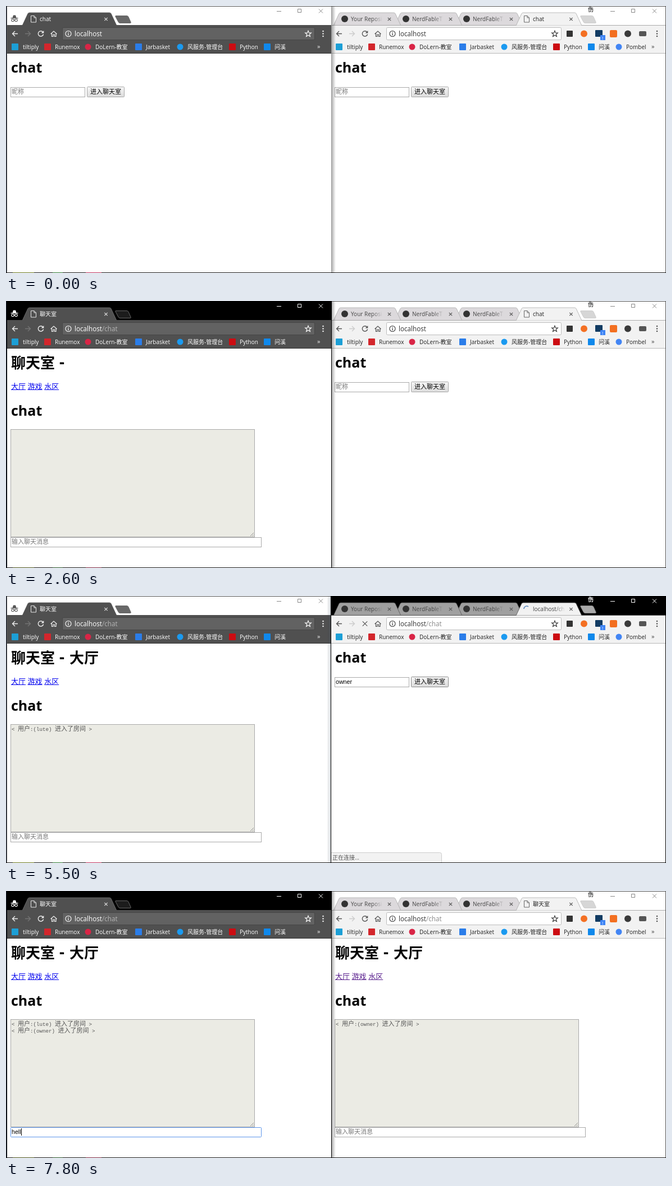
Write an HTML page that moves like this. It is 1175 px wide and 477 px high and loops after 8000 ms.

```html
<!DOCTYPE html>
<html lang="zh">
<head>
<meta charset="utf-8">
<title>chat</title>
<style>
html, body { margin: 0; width: 100%; height: 100%; overflow: hidden; background: #fff; }
svg { display: block; width: 1175px; height: 477px; }
text { white-space: pre; font-family: "Open Sans", "Noto Sans CJK SC", "Noto Sans CJK JP", sans-serif; }
.form { font-family: "Liberation Sans", "Noto Sans CJK SC", "Noto Sans CJK JP", sans-serif; }
.mono { font-family: "Liberation Mono", "Noto Sans CJK SC", "Noto Sans CJK JP", monospace; }
</style>
</head>
<body>
<svg viewBox="0 0 1175 477" xmlns="http://www.w3.org/2000/svg">
  <defs>
    <linearGradient id="btn" x2="0" y2="1"><stop stop-color="#f6f6f6"/><stop offset="1" stop-color="#dcdcdc"/></linearGradient>
    <linearGradient id="fade"><stop offset=".7" stop-color="#444"/><stop offset="1" stop-color="#444" stop-opacity=".1"/></linearGradient>
    <linearGradient id="shadeR"><stop stop-color="#000" stop-opacity=".3"/><stop offset="1" stop-color="#000" stop-opacity="0"/></linearGradient>
    <linearGradient id="shadeL"><stop stop-color="#345" stop-opacity="0"/><stop offset="1" stop-color="#345" stop-opacity=".22"/></linearGradient>
  </defs>
  <g id="stage"></g>
</svg>
<script>
const LOOP = 8000, STEP = 100, SHIFT = 577, FORM = 10.67;
const stage = document.getElementById("stage");
const pen = document.createElement("canvas").getContext("2d");
pen.font = FORM + 'px "Liberation Sans", sans-serif';

const rect = (x, y, w, h, fill, more = "") =>
  `<rect x="${x}" y="${y}" width="${w}" height="${h}" fill="${fill}" ${more}/>`;
const disc = (x, y, r, fill, more = "") => `<circle cx="${x}" cy="${y}" r="${r}" fill="${fill}" ${more}/>`;
const shape = (d, fill, more = "") => `<path d="${d}" fill="${fill}" ${more}/>`;
const line = (d, color, w = 1) => shape(d, "none", `stroke="${color}" stroke-width="${w}"`);
const text = (x, y, s, size, fill, more = "") =>
  `<text x="${x}" y="${y}" font-size="${size}" fill="${fill}" ${more}>${s}</text>`;
const group = (x, body) => `<g transform="translate(${x} 0)">${body}</g>`;

// Text typed so far: one character at each listed time
const typed = (word, times, t) => word.slice(0, times.filter(k => t >= k).length);
const caretOn = (t, start, keys) => {
  const last = Math.max(start, ...keys.filter(k => t >= k));
  const first = last === start ? 400 : 500;
  return t - last < first || Math.floor((t - last - first) / 500) % 2 === 1;
};

/* ---------- browser chrome ---------- */

function controls(x, color) {
  return line(`M${x - 4} 9.5h8`, color) + line(`M${x + 33.5} 5.5h6v6h-6z`, color) +
    line(`M${x + 71} 5.5l7 7m0 -7l-7 7`, color);
}

function tab(x, w, fill, stroke) {
  return shape(`M${x} 35L${x + 10} 13.5Q${x + 11} 12 ${x + 13} 12H${x + w - 13}Q${x + w - 11} 12 ${x + w - 10} 13.5L${x + w} 35z`,
    fill, `stroke="${stroke}" stroke-width=".8"`);
}

const cross = (x, y, color, r = 2.7) => line(`M${x - r} ${y - r}l${2 * r} ${2 * r}m0 ${-2 * r}l${-2 * r} ${2 * r}`, color, 1.2);
const docIcon = (x, color) => line(`M${x} 17.5h5.5l3.5 3.5v8h-9zM${x + 5.5} 17.5v3.5h3.5`, color);
const newTab = (x, fill, stroke) =>
  shape(`M${x} 19Q${x - 1} 17.5 ${x + 1} 17.5H${x + 20}q2 0 3 2l4 9q1 2 -1 2H${x + 8}q-2 0 -3 -2z`, fill, `stroke="${stroke}"`);

function nav(color, dim, loading) {
  const reload = loading ? cross(62, 49.5, color, 4.2)
    : line("M65.8 46.6A4.7 4.7 0 1 0 66.6 50.5", color, 1.4) + shape("M67.3 44v4.6h-4.6z", color);
  return line("M21 49.5H11.5M16 45l-4.5 4.5 4.5 4.5", color, 1.4) +
    line("M34 49.5h9.5M39 45l4.5 4.5 -4.5 4.5", dim, 1.4) + reload +
    line("M79.5 50l5.5 -5 5.5 5M81.5 49v5.5h2.5v-3.5h2.5v3.5h2.5v-5.5", color, 1.2);
}

function address(x, w, fill, edge, color, dim, path) {
  return rect(x + .5, 38.5, w, 22, fill, `rx="2" stroke="${edge}"`) +
    disc(x + 11, 49.5, 5, "none", `stroke="${color}" stroke-width="1.1"`) +
    line(`M${x + 11} 48.5v4M${x + 11} 46.3v1.2`, color, 1.2) +
    text(x + 22, 53.5, `localhost<tspan fill="${dim}">${path}</tspan>`, 11.7, color) +
    star(x + w - 11, color);
}

function star(x, color) {
  let d = "";
  for (let i = 0; i < 10; i++) {
    const a = i * Math.PI / 5, r = i % 2 ? 2.4 : 5.7;
    d += (i ? "L" : "M") + (x + r * Math.sin(a)).toFixed(1) + " " + (49.8 - r * Math.cos(a)).toFixed(1);
  }
  return line(d + "z", color, 1.1);
}

const dots = (x, color) => [45, 49.5, 54].map(y => disc(x, y, 1.3, color)).join("");

// label, text x, mark x, mark colour, round mark
const MARKS = [
  ["tiltiply", 30, 16, "#1c9fd6", 0], ["Runemox", 87, 74, "#d3262c", 0],
  ["DoLern-教室", 159, 146, "#d92546", 1], ["Jarbasket", 249, 236, "#2b7de9", 0],
  ["风服务-管理台", 323, 310, "#1b9af0", 1], ["Python", 416, 403, "#cc0c12", 0],
  ["问溪", 478, 465, "#0f88eb", 0], ["Pombel", 527, 514, "#4285f4", 1]
];

function bookmarks(count, color) {
  return MARKS.slice(0, count).map(([label, x, mx, fill, round]) =>
    (round ? disc(mx, 73, 5.5, fill) : rect(mx - 6, 67, 12, 12, fill, 'rx="1"')) +
    text(x, 76.6, label, 10, color)).join("");
}

function leftChrome(s) {
  const on = s.leftOn, ink = on ? "#fff" : "#555";
  let out = rect(1, 0, 578, 35, on ? "#000" : "#fff") + controls(486, on ? "#fff" : "#888");
  if (!s.noBadge) {
    out += shape("M11.5 21l1.5 -4.5h4l1.5 4.5z", ink) + line("M8.5 21.7h13", ink, 1.2) +
      [12, 18].map(x => disc(x, 25.5, 2.2, "none", `stroke="${ink}" stroke-width="1.1"`)).join("") + line("M14 25h2", ink);
  }
  out += tab(29, 168, "#505050", on ? "#777" : "#505050") + newTab(195, on ? "#1c1c1c" : "#686868", on ? "#666" : "#686868");
  out += docIcon(44.5, "#e8e8e8") + text(60, 27, s.leftChat ? "聊天室" : "chat", 10, "#fff") + cross(178, 23.5, "#ddd");
  out += rect(1, 34, 578, 51, "#505050") + rect(1, 84, 578, 1, "#333");
  return out + nav("#eee", "#737373", false) +
    address(100, 449, "#626262", "#454545", "#fff", "#b5b5b5", s.leftChat ? "/chat" : "") +
    dots(564.5, "#eee") + bookmarks(7, "#fff") + text(554, 76, "»", 11, "#eee");
}

function rightChrome(s) {
  const on = s.rightOn, idle = on ? "#a0a0a0" : "#dcd9dc", edge = on ? "#555" : "#aaa";
  let out = rect(579, 0, 595, 35, on ? "#000" : "#fff") + controls(1080, on ? "#fff" : "#888") +
    text(1036, 10, "伤", 10, on ? "#fff" : "#444", 'font-weight="700"');
  [["NerdFableT", 800], ["NerdFableT", 692], ["Your Reposi", 583]].forEach(([label, x]) => {
    out += tab(x, 120, idle, edge) + disc(x + 20, 23, 6, "#333") +
      text(x + 31, 27, label, 10, "url(#fade)") + cross(x + 99.5, 23.5, "#555");
  });
  out += newTab(1023, on ? "#aaa" : "#d6d6d6", on ? "#888" : "#ccc");
  out += rect(579, 34, 595, 1, edge) + tab(908, 117, "#f2f2f2", edge);
  if (s.loading) {
    out += `<g transform="rotate(${(5500 - s.t) * .36} 927 23)">` + line("M922 23A5 5 0 0 1 929.9 19", "#5a87bd", 1.6) + "</g>" +
      text(938, 27, "localhost/ch", 10, "url(#fade)");
  } else {
    out += docIcon(922.5, "#666") + text(938, 27, s.rightChat ? "聊天室" : "chat", 10, "#222");
  }
  out += cross(1006, 23.5, "#555") + rect(579, 35, 595, 50, "#f2f2f2") + rect(579, 84, 595, 1, "#b8b8b8");
  out += group(SHIFT, nav("#555", "#ccc", s.loading) + bookmarks(8, "#222"));
  out += address(677, 311, "#fff", "#bcbcbc", "#333", "#888", s.loading || s.rightChat ? "/chat" : "");
  out += rect(998, 44, 11, 11, "#333", 'rx="1"') + disc(1029, 49.5, 6, "#f47023") +
    rect(1049, 43, 13, 12, "#123c63", 'rx="1"') + rect(1058, 52, 9, 9, "#3d84f5") + text(1061, 60, "!", 8, "#fff") +
    rect(1075, 43, 13, 13, "#f36f20", 'rx="2"') + disc(1107, 49.5, 6, "#3a3a3a") +
    rect(1127, 45, 13, 9, "#555", 'rx="2"');
  return out + dots(1159, "#555") + text(1149, 76, "»", 11, "#444");
}

/* ---------- pages ---------- */

function field(y, w, f) {
  const shown = f.value ? text(10, y + 12, f.value, FORM, "#000", 'class="form"')
    : text(10, y + 12, f.hint, 11, "#777", 'class="form"');
  const x = Math.round(10 + pen.measureText(f.value).width);
  return rect(8.5, y + .5, w, 17, "#fff", f.focus ? 'rx="1" stroke="#5a94ea"' : 'stroke="#a9a9a9"') +
    shown + (f.focus && f.caret ? rect(x, y + 2, 1, 13, "#000") : "");
}

const heading = (x, y, s, size) => text(x, y, s, size, "#000", 'font-weight="700"');

function loginPage(p) {
  const b = p.button;
  let out = heading(9, 119, "chat", 25) + field(145, 132, p.name) +
    rect(144.5, 144.5, 66, 18, b === 2 ? "#e9e9e9" : "url(#btn)", `rx="1" stroke="${b === 1 ? "#8c8c8c" : "#a8a8a8"}"`) +
    text(150, 157, "进入聊天室", 11, "#000", 'class="form"');
  if (p.list) {
    const h = p.list.length * 19.6 + 1;
    out += `<g opacity="${p.listAlpha}">` + rect(8.5, 162.5, 132.5, h, "#fff", 'stroke="#a9a9a9"') +
      p.list.map((s, i) => text(15, 176.3 + i * 19.6, s, FORM, "#000", 'class="form"')).join("") + "</g>";
  }
  return out;
}

function entered(user, y) {
  const cn = s => `<tspan font-size="11">${s}</tspan>`;
  return text(10, y, `&lt; ${cn("用户")}:(${user}) ${cn("进入了房间")} &gt;`, 9.17, "#555", 'class="mono"');
}

function chatPage(p) {
  const color = p.visited ? "#551a8b" : "#0000ee";
  let out = heading(9, 120, "聊天室", 26) + heading(95, 119, "-", 28);
  if (p.joined) out += heading(113, 120, "大厅", 26);
  ["大厅", "游戏", "水区"].forEach((s, i) => {
    const x = 9 + i * 29.6;
    out += text(x, 157, s, 13, color) + rect(x, 158, 26, 1, color);
  });
  out += heading(9, 205, "chat", 25) + rect(8.5, 229.5, 434, 192, "#ebebe4", 'stroke="#a9a9a9"') +
    line("M435 420l6 -6M438.5 420l2.5 -2.5", "#888", .9);
  p.users.forEach((u, i) => out += entered(u, 241 + i * 12));
  return out + field(422, 446, p.message);
}

// Thin window borders over the desktop strip
function borders(s) {
  const a = s.leftOn ? "#000" : "#555", b = s.rightOn ? "#000" : "#555";
  const split = s.rightOn ? 578 : 580;
  return (s.rightOn
    ? rect(571, 0, 7, 476, "url(#shadeL)") + rect(578, 0, 1, 476, b)
    : rect(580, 0, 7, 476, "url(#shadeR)") + rect(579, 0, 1, 476, s.leftOn ? a : "#999")) +
    rect(0, 0, 1, 477, "#18202e") + rect(1, 0, 1, 477, a) + rect(1, 0, split - 1, 1, a) +
    rect(split, 0, 1175 - split, 1, b) + rect(1174, 0, 1, 477, b) + rect(0, 476, 1175, 1, "#181818") +
    `<g opacity="${s.leftOn ? .6 : 1}">` + rect(12, 476, 38, 1, "#6d7a1c") +
    rect(83, 476, 18, 1, "#2c7a30") + rect(142, 476, 28, 1, "#c0305c") + "</g>";
}

/* ---------- timeline ---------- */

const NAME_A = "lute", NAME_B = "owner";
const KEYS_A = [1300, 1400, 1500, 1600], KEYS_B = [3300, 3400, 4100, 4100, 4200], KEYS_M = [7300, 7400, 7600, 7800];
const LIST_A = ["lute", "lutelute", "Lute", "lute1"];
const LIST_B = ["owner", "orchard", "orbit1", "oak", "olive", "ocean"];

function draw(t) {
  const between = (a, b) => t >= a && t < b;
  const s = {
    t, leftOn: between(600, 2900) || t >= 6600, rightOn: between(2900, 6600),
    leftChat: t >= 2600, rightChat: t >= 5600, loading: between(4800, 5600), noBadge: between(3000, 3100)
  };
  const input = (hint, word, keys, start, end) => ({
    hint, value: typed(word, keys, t), focus: between(start, end), caret: caretOn(t, start, keys)
  });
  const hint = "输入聊天消息";

  const left = s.leftChat ? chatPage({
    joined: t >= 2900, users: t < 2900 ? [] : t < 5900 ? [NAME_A] : [NAME_A, NAME_B],
    message: input(hint, "hell", KEYS_M, 6600, LOOP)
  }) : loginPage({
    name: input("昵称", NAME_A, KEYS_A, 600, 2500),
    button: t >= 2500 ? 2 : t >= 2300 ? 1 : 0,
    list: between(1300, 2600) && LIST_A, listAlpha: t < 2500 ? 1 : .03
  });

  const right = s.rightChat ? chatPage({
    visited: true, joined: t >= 5900, users: t < 5900 ? [] : [NAME_B],
    message: input(hint, "", [], LOOP, LOOP)
  }) : loginPage({
    name: input("昵称", NAME_B, KEYS_B, 3100, 4700),
    button: t >= 4700 ? 1 : 0,
    list: between(3300, 4800) && LIST_B.slice(0, t < 3400 ? 6 : 1), listAlpha: t < 4700 ? 1 : .03
  });

  let out = rect(0, 0, 1175, 477, "#fff") + leftChrome(s) + left + rightChrome(s) + group(SHIFT, right);
  if (between(4800, 6000)) {
    out += `<g opacity="${t < 5900 ? 1 : .4}">` +
      shape("M578.5 476.5V458.5H772.5q3 0 3 3V476.5z", "#f2f2f2", 'stroke="#ccc"') +
      text(581, 471, "正在连接...", 10, "#555") + "</g>";
  }
  stage.innerHTML = out + borders(s);
}

let shown = -1;
function tick() {
  const step = Math.floor(performance.now() % LOOP / STEP);
  if (step !== shown) draw((shown = step) * STEP);
  requestAnimationFrame(tick);
}
tick();
</script>
</body>
</html>
```
